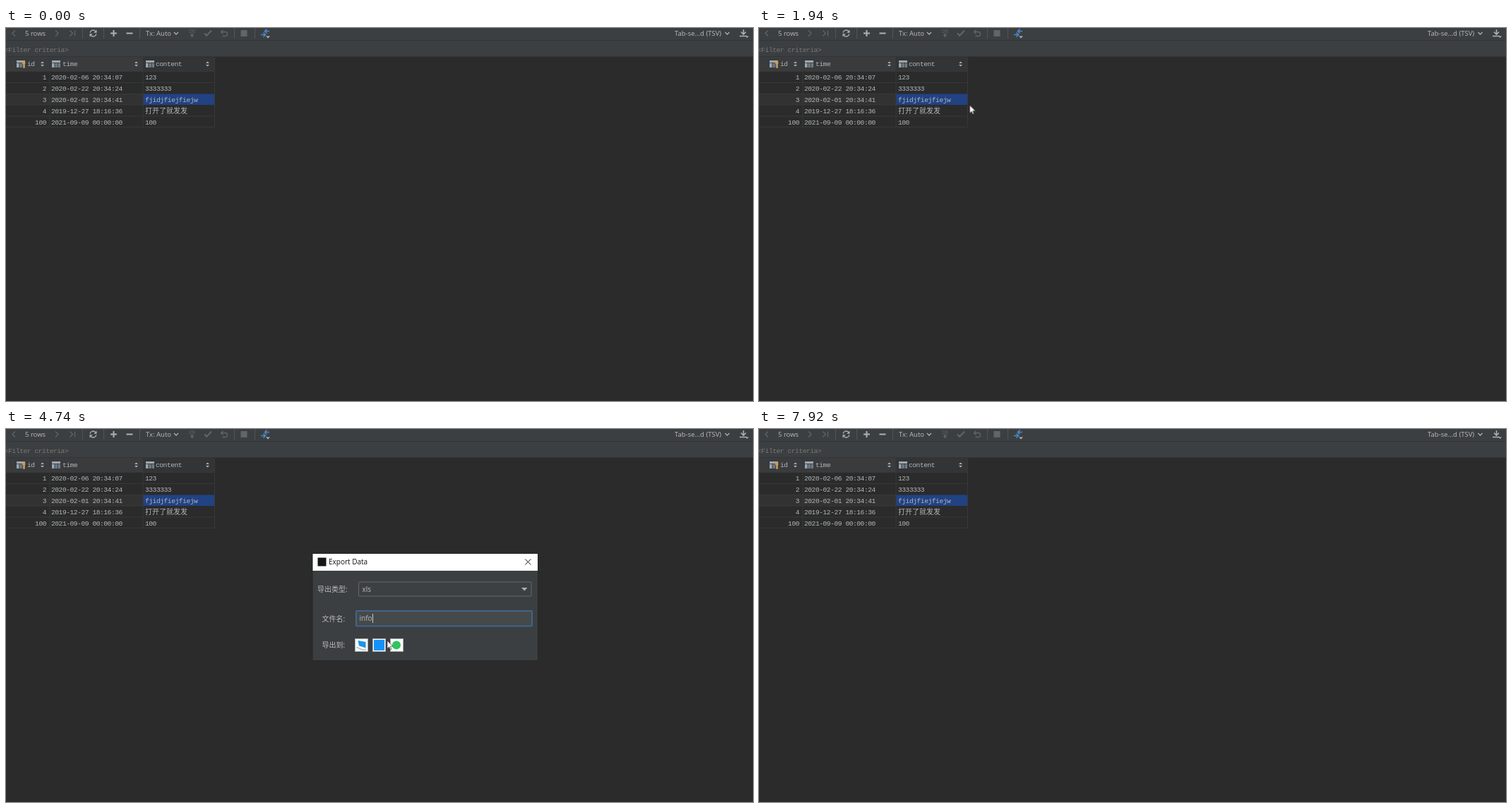
Recreate the animation shown at these times as an HTML page. Size 1058 by 529 pixels, loop 7990 ms.

```html
<!DOCTYPE html>
<html lang="en">
<head>
<meta charset="utf-8">
<title>Export data</title>
<style>
html, body { margin: 0; width: 100%; height: 100%; overflow: hidden; background: #2b2b2b; }
svg { display: block; width: 100vw; height: 100vh; }
text { font: 11px "Open Sans", "Noto Sans", "Noto Sans CJK SC", "Noto Sans CJK", sans-serif; fill: #bbb; white-space: pre; }
.bar { font-size: 9.5px; }
.dlg { font-size: 10px; }
.mono { font: 9.6px "Liberation Mono", "Noto Sans CJK SC", "Noto Sans CJK", monospace; letter-spacing: -.45px; fill: #b4b6b8; }
.cjk { font-size: 10px; letter-spacing: 0; }
.dim { fill: #777; color: #6c6e70; }
.off { color: #626567; }
.end { text-anchor: end; }
.ic { color: #afb1b3; }
.line { fill: none; stroke: currentColor; stroke-width: 1.3; }
.thick { stroke-width: 2; }
.solid { fill: currentColor; }
.ring { fill: #45494a; stroke: #3f658c; stroke-width: 2; }

.hold, .fade { animation: 7.99s step-end infinite; }
#menu { animation-name: menu; }
#hover { animation-name: hover; }
#dialog { animation-name: dialog; }
#comboRing { animation-name: comboRing; }
#popup { animation-name: popup; }
#pick { animation-name: pick; }
#nameRing { animation-name: nameRing; }
#caret { animation-name: caret; }
#pointer { animation-name: pointer; }
#click { animation-name: click; }
#path { animation: path 7.99s linear infinite; }

@keyframes menu { 0%, 24.27% { visibility: hidden } 11.63% { visibility: visible } }
@keyframes hover { 0%, 24.27% { visibility: hidden } 14.51% { visibility: visible } }
@keyframes dialog { 0%, 99.11% { opacity: 0 } 28.28%, 98.24% { opacity: .5 } 29.28% { opacity: 1 } }
@keyframes comboRing { 0%, 54.31% { opacity: 0 } 40.17% { opacity: 1 } }
@keyframes popup { 0%, 50.68% { opacity: 0 } 40.17% { opacity: 1 } }
@keyframes nameRing { 0% { opacity: 0 } 54.31% { opacity: 1 } }
@keyframes caret {
  0%, 61.95%, 74.47%, 86.98% { opacity: 0 }
  55.31%, 68.2%, 80.72%, 93.23% { opacity: 1 }
}
@keyframes pointer { 0%, 89.23% { visibility: hidden } .87% { visibility: visible } }
@keyframes click {
  0%, 10.5%, 24.27%, 40.79%, 50.68%, 55.31% { opacity: 0 }
  9.63%, 23.27%, 38.91%, 49.68%, 54.31% { opacity: .6 }
}
@keyframes path {
  0%, .87% { transform: translate(895px, 487px); animation-timing-function: cubic-bezier(.35, .2, .4, 1) }
  9.63% { transform: translate(235px, 101px) }
  10.5%, 13.7% { transform: translate(232.5px, 100px); animation-timing-function: ease-in-out }
  20.4%, 28.28% { transform: translate(298.5px, 109.5px); animation-timing-function: ease-in-out }
  37.9%, 45.2% { transform: translate(546.5px, 230px) }
  45.56%, 47% { transform: translate(545.5px, 230.5px) }
  49.3%, 50.7% { transform: translate(542px, 247px) }
  54%, 56.6% { transform: translate(520px, 260px) }
  59.32% { transform: translate(540px, 300px) }
  60.33%, 61.4% { transform: translate(534px, 306px); animation-timing-function: ease-in-out }
  65.08%, 67.2% { transform: translate(500px, 304px); animation-timing-function: ease-in-out }
  72.84%, 74% { transform: translate(530px, 304px); animation-timing-function: ease-in-out }
  77.6%, 79.8% { transform: translate(567px, 310px) }
  84.48% { transform: translate(711.5px, 222px) }
  85.48% { transform: translate(745px, 208px) }
  88.24%, 100% { transform: translate(899px, 449px) }
}
</style>
</head>
<body>
<svg viewBox="0 0 1058 529" preserveAspectRatio="none">
  <defs>
    <path id="left" class="line" d="M2-4-2 0 2 4"/>
    <path id="right" class="line" d="M-2-4 2 0-2 4"/>
    <path id="first" class="line" d="M-3.5-4V4M3.5-4-.5 0 3.5 4"/>
    <path id="last" class="line" d="M3.5-4V4M-3.5-4 .5 0-3.5 4"/>
    <path id="down" class="line" d="M-3-1.5 0 1.5 3-1.5"/>
    <path id="plus" class="line thick" d="M-4.5 0H4.5M0-4.5V4.5"/>
    <path id="minus" class="line thick" d="M-4.5 0H4.5"/>
    <path id="check" class="line thick" d="M-5 0-1.8 3.2 5-4"/>
    <path id="undo" class="line" d="M-1.5-5-4.5-2-1.5 1M-4.5-2H1.5A3 3 0 0 1 1.5 4H-2.5"/>
    <g id="reload">
      <path class="line" stroke-width="1.6" d="M-4.4-.8A4.4 4.4 0 0 1 3.2-3M4.4 .8A4.4 4.4 0 0 1-3.2 3"/>
      <path class="solid" d="M5-5V-.8H.8ZM-5 5V.8H-.8Z"/>
    </g>
    <g id="db">
      <text x="-4.6" y="-.6" style="font-size:6.5px;fill:currentColor">DB</text>
      <path class="solid" d="M0 0 3 3H1V5.5H-1V3H-3Z"/>
    </g>
    <path id="copy" class="line" d="M-4.5 3V-4.5H3M-2-2H4.5V5H-2ZM0 .5H3M0 2.8H3"/>
    <path id="more" class="solid" d="M-2.2-3.7 2.6 0-2.2 3.7Z"/>
    <path id="sort" class="solid" d="M-2.5-.9 0-3.6 2.5-.9ZM-2.5 .9 0 3.6 2.5 .9Z"/>
    <g id="column">
      <path fill="#9aa7b0" d="M-6-5H6V-2H-6ZM-6-1.2H-2.5V5H-6Z"/>
      <path fill="#6e7b84" d="M-1.6-1.2H1.8V5H-1.6ZM2.6-1.2H6V5H2.6Z"/>
    </g>
  </defs>

  <rect width="1058" height="529" fill="#2b2b2b"/>
  <rect width="1058" height="41" fill="#3c3f41"/>
  <path d="M0 17.5H1058M0 40.5H1058" stroke="#323435"/>
  <path d="M108.5 0V15M138.5 0V15M189.5 0V15M323.5 0V15M352.5 0V15" stroke="#515355"/>
  <g id="toolbar"></g>
  <rect x="332.5" y="3" width="9" height="9" fill="#626567"/>
  <g fill="none" stroke="#4a88c7" stroke-width="1.6">
    <path d="M361 9.5H367M364.5 6.5 367.5 9.5 364.5 12.5M373 4.5H367M369.5 1.5 366.5 4.5 369.5 7.5"/>
  </g>
  <path d="M368 11.5H374L371 14.5Z" fill="#afb1b3"/>
  <path d="M1044.5 2V8M1041 5.5 1044.5 9 1048 5.5M1039 11.5H1049" fill="none" stroke="#afb1b3" stroke-width="1.6"/>
  <path d="M1047.5 11.5H1052L1049.7 14Z" fill="#afb1b3"/>
  <text class="bar" x="27" y="10.8">5 rows</text>
  <text class="bar" x="198" y="10.8">Tx: Auto</text>
  <text class="bar" x="947" y="10.8">Tab-se...d (TSV)</text>
  <text class="mono dim" x="-2" y="33.6">&lt;Filter criteria&gt;</text>

  <rect y="41" width="194" height="20.5" fill="#393b3d"/>
  <rect x="194" y="41" width="101.500" height="20.5" fill="#323436"/>
  <rect y="93.500" width="194" height="15.500" fill="#323232"/>
  <rect x="194" y="93.500" width="101.500" height="15.500" fill="#214283"/>
  <path d="M0 61.5H295.500M0 77.500H295.500M0 93.500H194M0 109H194M0 125H295.500M0 140.500H295.500M62 41V140.500M194 41V140.500M295.500 41V140.500" stroke="#373839" fill="none"/>
  <g id="table"></g>
  <path d="M24 47.500A2 2 0 1 1 26.500 51.300V57H24.500V51.300A2 2 0 0 1 24 47.500Z" fill="#d99a45"/>

  <g id="menu" class="hold">
    <rect x="235.500" y="101.500" width="205" height="440" fill="#3c3f41" stroke="#515355"/>
    <rect id="hover" class="hold" x="236" y="102" width="204" height="18" fill="#4b6eaf"/>
    <g id="items"></g>
  </g>

  <g id="dialog" class="fade">
    <rect x="434" y="176.500" width="319.500" height="152" fill="#3c3f41" stroke="#252627"/>
    <rect x="434.500" y="177" width="318.500" height="24" fill="#fff"/>
    <rect x="441.500" y="182.500" width="12" height="12" fill="#161616"/>
    <text class="dlg" x="457" y="192.400" style="fill:#111">Export Data</text>
    <path d="M735.300 184.500 743.300 192.500M743.300 184.500 735.300 192.500" stroke="#111"/>
    <text class="dlg" x="441" y="230.800">导出类型:</text>
    <text class="dlg" x="447.500" y="272.500">文件名:</text>
    <text class="dlg" x="447.500" y="310.300">导出到:</text>

    <rect x="499.500" y="217" width="244.500" height="20" rx="1" fill="#3d4042" stroke="#646667"/>
    <rect id="comboRing" class="fade ring" x="499" y="216.500" width="246" height="21" rx="2" style="fill:#3d4042"/>
    <text class="dlg" x="504.500" y="230.600">xls</text>
    <path d="M730 225H738.500L734.200 229.500Z" fill="#a9b3ae"/>

    <rect x="497" y="259" width="247" height="19" fill="#45494a" stroke="#646667"/>
    <rect id="nameRing" class="fade ring" x="496" y="258" width="249" height="21.500" rx="1"/>
    <text class="dlg" x="500.500" y="272.300">info</text>
    <rect id="caret" class="fade" x="519" y="262" width="1" height="13" fill="#ccc"/>

    <g fill="#fafafa" stroke="#a9abad">
      <rect x="494.500" y="297.500" width="18" height="18"/>
      <rect x="519.500" y="297.500" width="18" height="18"/>
      <rect x="544.500" y="297.500" width="18" height="18"/>
    </g>
    <path d="M498.500 300 509.500 302V310.500L500 307.500Z" fill="#1c95e8"/>
    <path d="M496.500 309.500 506 313.500 510 312.500" fill="none" stroke="#b9bec2" stroke-width="1.500"/>
    <rect x="521" y="299" width="15" height="15" fill="#1592fa"/>
    <circle cx="553" cy="306.500" r="6" fill="#2dc75c"/>

    <g id="popup" class="fade">
      <rect x="497.500" y="239.500" width="249" height="59" fill="#3c3f41" stroke="#111"/>
      <rect x="498" y="240" width="248" height="15" fill="#4b6eaf"/>
      <g id="types"></g>
    </g>
  </g>

  <g id="pointer" class="hold">
    <g id="path">
      <path d="M0 0V11.400L2.600 8.900 4.300 12.800 6 12.100 4.300 8.200H8Z" fill="#fff" stroke="#1a1a1a" stroke-width=".6"/>
      <circle id="click" class="fade" cx=".5" cy=".2" r="10" fill="#ebdf0c"/>
    </g>
  </g>
</svg>
<script>
const fill = (id, parts) => document.getElementById(id).innerHTML = parts.join('');
const text = (x, y, s, cls = '') => `<text x="${x}" y="${y}" class="${cls}">${s}</text>`;
const icon = (name, x, y, cls = 'ic') => `<use href="#${name}" x="${x}" y="${y}" class="${cls}"/>`;

fill('toolbar', [
  ['left', 11, 'off'], ['right', 72, 'off'], ['last', 94, 'off'],
  ['reload', 123.5], ['plus', 152.5], ['minus', 175], ['down', 241],
  ['db', 263.5, 'off'], ['check', 286, 'off'], ['undo', 309, 'off'], ['down', 1021.5]
].map(([name, x, cls]) => icon(name, x, 7.5, cls)));

const heads = [['id', 21, 30, 51.5], ['time', 71, 80, 184.5], ['content', 204, 212, 285.5]];
const rows = [
  [1, '2020-02-06 20:34:07', '123'],
  [2, '2020-02-22 20:34:24', '3333333'],
  [3, '2020-02-01 20:34:41', 'fjidjfiejfiejw'],
  [4, '2019-12-27 18:16:36', '打开了就发发'],
  [100, '2021-09-09 00:00:00', '100']
];
fill('table', [
  ...heads.map(([name, ix, tx, sx]) =>
    icon('column', ix, 51) + text(tx, 54.2, name, 'mono') + icon('sort', sx, 51)),
  ...rows.map(([id, time, content], i) => {
    const y = 73.3 + i * 15.87;
    return text(57, y, id, 'mono end') + text(64, y, time, 'mono') +
      text(197, y, content, /^\w/.test(content) ? 'mono' : 'mono cjk');
  })
]);

// label, shortcut ('>' opens a submenu), icon, disabled; null is a separator
const items = [
  ['Export Data(RowFerryQ)', 'Alt+Q'], ['Edit', 'F2'], ['Edit Maximized', 'Shift+Enter'], null,
  ['Set NULL', 'Ctrl+Alt+N'], ['Load File...'], null,
  ['Submit', 'Ctrl+Enter', 'db', 1], ['Revert Selected', 'Ctrl+Alt+Z', 'undo', 1], null,
  ['First Page', '', 'first', 1], ['Previous Page', 'Ctrl+Alt+向上箭头', 'left', 1],
  ['Next Page', 'Ctrl+Alt+向下箭头', 'right', 1], ['Last Page', '', 'last', 1], null,
  ['Reload Page', 'Ctrl+F5', 'reload'], null,
  ['Add New Row', 'Alt+Insert', 'plus'], ['Delete Row', 'Ctrl+Y', 'minus'], ['Clone Row', 'Ctrl+D'], null,
  ['Quick <tspan text-decoration="underline">D</tspan>ocumentation', 'Ctrl+Q'], null,
  ['Transpose'], null,
  ['Tx Mode: Auto', '>'], ['Tx Isolation: Repeatable Read', '>'],
  ['Commit', 'Ctrl+Alt+Shift+Enter', 'check', 1], null,
  ['Go To', '>'], ['Filter by', '>'], null,
  ['Copy', 'Ctrl+C', 'copy']
];
let y = 111;
fill('items', items.map(item => {
  if (!item) {
    const line = `<path d="M236 ${Math.round(y - 8) + .5}H440" stroke="#515355"/>`;
    y += 2.74;
    return line;
  }
  const [label, keys = '', name, off] = item;
  const cls = off ? 'dim' : '';
  const out = (name ? icon(name, 245.5, y, off ? 'dim' : 'ic') : '') + text(256, y + 3.9, label, cls) +
    (keys === '>' ? icon('more', 430, y) : text(431.5, y + 3.9, keys, cls + ' end'));
  y += 17.8;
  return out;
}));

fill('types', ['xls', 'xlsx', 'sql', 'json'].map((s, i) => text(499, 251.2 + i * 14.6, s, 'dlg')));
</script>
</body>
</html>
```
